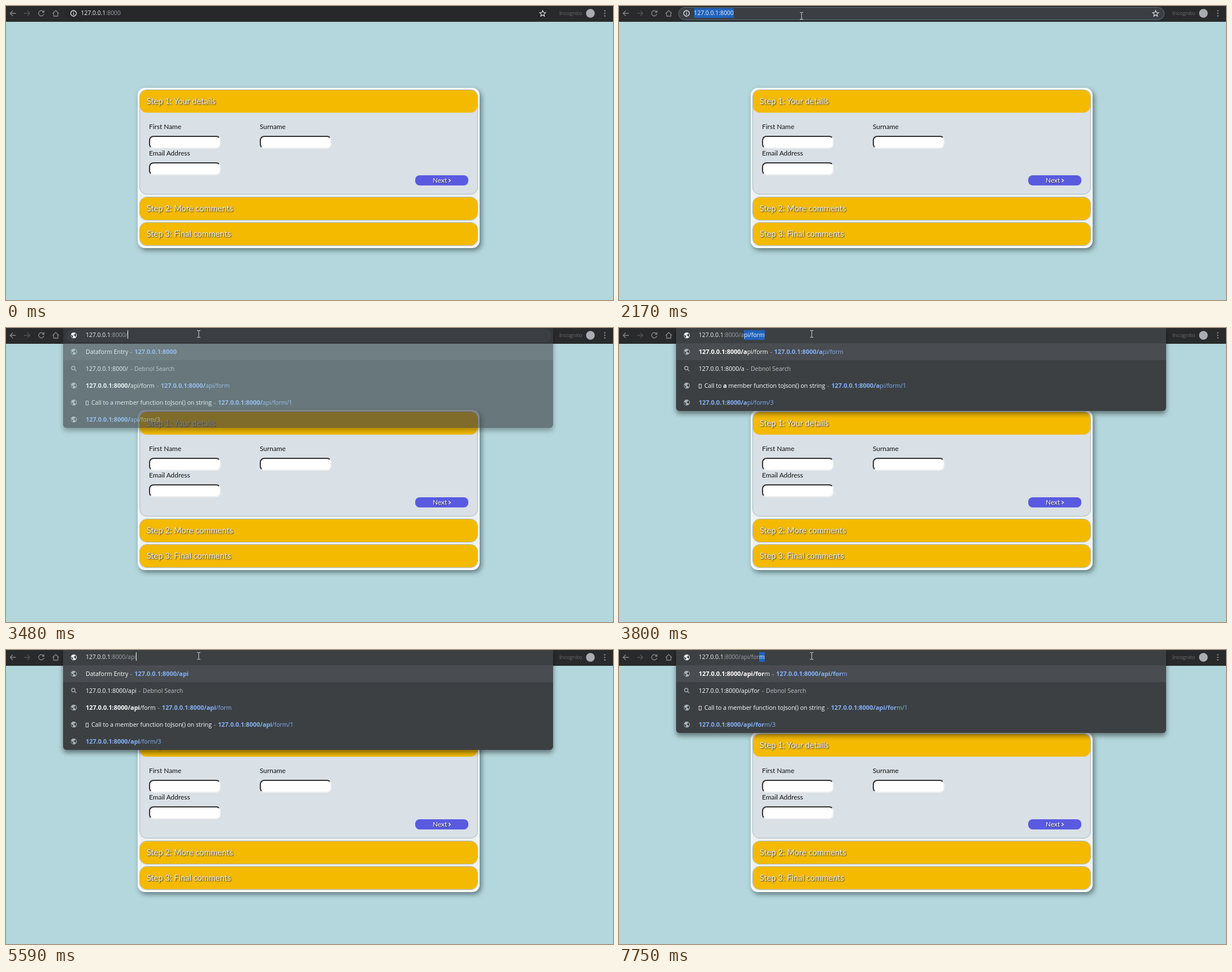
Recreate the animation shown at these times as an HTML page. Size 1074 px wide and 521 px high, loop 7990 ms.

```html
<!DOCTYPE html>
<html lang="en">
<head>
<meta charset="utf-8">
<title>Form</title>
<style>
html, body { margin: 0; width: 100%; height: 100%; overflow: hidden; }
body { position: relative; background: #b3d7dc; font: 11.9px Lato, sans-serif; color: #111; }
div, .abs { position: absolute; box-sizing: border-box; white-space: pre; }
svg { position: absolute; left: 0; top: 0; overflow: visible; }

.card { left: 233px; top: 145px; width: 605px; height: 284px; border: 3px solid #fafbfb; border-radius: 13px;
  background: #eef0f1; box-shadow: 3px 4px 9px rgba(40, 60, 65, .6); }
.panel { left: 236px; width: 599px; border: 1px solid #a5bac2; border-radius: 13px; background: #d9e0e6; }
.head { left: 0; top: 0; width: 597px; height: 40px; border-radius: 12px; background: #f3ba00; color: #f0f0f0;
  font-size: 14.6px; line-height: 40px; padding-left: 12px; text-shadow: 1px 1px 2px #333; }
.label { line-height: 16px; }
.field { width: 127px; height: 23px; border: 2px inset #767676; border-color: #858585 #ededed #ededed #858585;
  border-radius: 8px; background: #fff; }
.next { left: 724px; top: 300px; width: 94px; height: 18px; border-radius: 8px; background: #5a5ae0; color: #fff;
  line-height: 17px; padding-left: 31px; text-shadow: 1px 1px 1px #333; }

.bar { left: 0; top: 0; width: 100%; height: 27.5px; background: #292a2c; }
.pill { left: 105px; top: 2px; width: 860px; height: 22.5px; border-radius: 12px; background: #27282a; border: 1.5px solid transparent;
  background-clip: border-box; }
.pill.hover { background: #35383b; border-color: #35383b; }
.pill.focus { background: #3b3f43; border-color: #62727e; }
.pill.open { background: #3b3f43; border-color: #3b3f43; }
.ui { font-family: "Open Sans", "Noto Sans", sans-serif; }
.pop { left: 101px; top: 0; width: 867px; border-radius: 0 0 6px 6px; background: #3c4043; overflow: visible;
  box-shadow: 0 5px 9px rgba(0, 0, 0, .45); color: #fff; font-size: 10.5px; }
.row { left: 0; width: 867px; height: 30px; line-height: 30px; padding-left: 40px; }
.row.on { background: #494c50; }
.row b { font-size: 10.9px; }
.row svg { left: 18.5px; top: 15px; }
.link { color: #84b1f6; }
.grey { color: #bdc1c6; }
.dash { margin: 0 3.8px; color: #bdc1c6; }
.tofu { display: inline-block; width: 5px; height: 8px; border: 1px solid #ddd; box-sizing: border-box; margin-right: 5px; vertical-align: -0.5px; }
.url { top: 4px; height: 17px; line-height: 17px; font-size: 10.4px; color: #f1f3f4; }
.url i { font-style: normal; color: #9aa0a6; }
.url .sel, .url .sel i { background: #2063be; color: #f1f3f4; display: inline-block; height: 17px; }
.caret { top: 4px; width: 1px; height: 15px; background: #f1f3f4; display: inline-block; position: absolute; }
</style>
</head>
<body>
<div class="card"></div>
<div class="panel" style="top:148px;height:186px"><div class="head">Step 1: Your details</div></div>
<div class="panel" style="top:338px;height:42px"><div class="head">Step 2: More comments</div></div>
<div class="panel" style="top:383px;height:42px"><div class="head">Step 3: Final comments</div></div>
<div class="label" style="left:253px;top:206px">First Name</div>
<div class="label" style="left:449px;top:206px">Surname</div>
<div class="label" style="left:253px;top:253px">Email Address</div>
<div class="field" style="left:253px;top:230px"></div>
<div class="field" style="left:449px;top:230px"></div>
<div class="field" style="left:253px;top:277px"></div>
<div class="next">Next<svg width="1" height="1"><path d="M59.5 6.5l2.8 2.7-2.8 2.7" fill="none" stroke="#fff" stroke-width="1.3"/></svg></div>

<div class="bar"></div>
<div class="pill" id="pill"></div>
<svg width="1074" height="28" fill="none" stroke-width="1.3">
  <defs>
    <g id="globe">
      <circle r="5.3" fill="currentColor" stroke="none"/>
      <path d="M-4.6 -1.6L-1.5 1.5V4.2Q-4.6 3 -4.6 -1.6ZM0 -4.4L2.4 -3.6Q2.4 -1 .2 -1L-1 .3 2 .6 2.6 2.6 3.8 2.2Q5 -1 3 -3.4" fill="#35393c" stroke="none"/>
    </g>
    <g id="lens" fill="none" stroke="currentColor" stroke-width="1.3">
      <circle cx="-1" cy="-1" r="3"/><path d="M1.3 1.3L4.4 4.4"/>
    </g>
  </defs>
  <path stroke="#85888b" d="M17.5 13H7.5M12 8.3L7.3 13l4.700 4.700"/>
  <path stroke="#515356" d="M32 13h10M37.500 8.300L42.200 13l-4.700 4.700"/>
  <path stroke="#85888b" d="M66.300 10.300A4.700 4.700 0 1 0 67 14M67.300 7.500V11h-3.500"/>
  <path stroke="#85888b" d="M82.500 13.300L88 8l5.500 5.300M84.300 12V18h7.400V12"/>
  <circle cx="1034" cy="13" r="7.700" fill="#a9adb1"/>
  <g fill="#8b8e92"><circle cx="1059.500" cy="8.500" r="1.200"/><circle cx="1059.500" cy="13" r="1.200"/><circle cx="1059.500" cy="17.500" r="1.200"/></g>
  <g id="pageIcons" stroke="#e8eaed">
    <circle cx="119.500" cy="13" r="5"/><path d="M119.500 12.300v3.400M119.500 10v1.300"/>
    <path stroke-width="1.100" d="M949.500 8l1.500 3.500 3.800.3-2.900 2.500.9 3.700-3.300-2-3.300 2 .9-3.700-2.900-2.500 3.800-.3z"/>
  </g>
</svg>
<div class="ui" style="left:979px;top:5px;line-height:16px;font-size:9.3px;color:#6a6d71">Incognito</div>

<div class="pop ui" id="pop"></div>
<svg id="urlGlobe" width="1" height="1" style="left:119.500px;top:13px;color:#eceff1"><use href="#globe"/></svg>
<div class="url ui" id="url"></div>

<svg id="arrow" width="1" height="1"><path d="M0 0V14L3.200 11.200 5.500 16.200 7.700 15.200 5.500 10.300H10Z" fill="#fff" stroke="#111" stroke-width=".9"/></svg>
<svg id="beam" width="1" height="1"><path d="M-3 -6H-.8L0 -5.300.8 -6H3M0 -5.300V5.300M-3 6H-.8L0 5.300.8 6H3" fill="none" stroke="#d5d7d9" stroke-width="1"/></svg>

<script>
const LOOP = 7990, HOST = '127.0.0.1:8000', FORM = '/api/form';
const $ = id => document.getElementById(id);

// Each step adds to the state before it.
const steps = [
  [0, { pill: '', path: '', all: false, caret: false, fade: 1 }],
  [1010, { pill: 'hover' }],
  [1080, { pill: 'focus' }],
  [1240, { all: true }],
  [2700, { all: false, caret: true }],
  [3170, { caret: false }],
  [3480, { pill: 'open', path: '/', caret: true, fade: .63 }],
  [3590, { fade: 1 }],
  [3800, { path: '/a' }],
  [5200, { path: '/ap' }],
  [5590, { path: '/api' }],
  [6040, { caret: false }],
  [6510, { caret: true }],
  [6590, { path: '/api/' }],
  [7390, { path: '/api/f' }],
  [7600, { path: '/api/fo' }],
  [7750, { path: '/api/for' }]
];

const beamStops = [
  [930, 323, 10], [1240, 325, 13], [2170, 323, 17], [2240, 327, 20],
  [2400, 331, 20], [2480, 337, 18], [2550, 344, 13], [2620, 343, 11], [2700, 341, 10]
];

const icon = name => `<svg width="1" height="1" style="color:#a9b4b7"><use href="#${name}"/></svg>`;
const dash = '<span class="dash">-</span>';
const link = html => `<span class="link">${html}</span>`;

function popup(path) {
  const typed = HOST + path;
  const match = end => `<b>${typed}</b>${(HOST + end).slice(typed.length)}`;
  const home = path === '/' || path === '/api';
  const word = path === '/a' ? '<b>a</b>' : 'a';
  const search = ['lens', typed + dash + '<span class="grey">Debnol Search</span>'];
  const form = ['globe', match(FORM) + dash + link(match(FORM))];
  const rows = home
    ? [['globe', 'Dataform Entry' + dash + link(`<b>${typed.replace(/\/$/, '')}</b>`)], search, form]
    : [form, search];
  rows.push(
    ['globe', `<span class="tofu"></span>Call to ${word} member function toJson() on string` + dash + link(match(FORM + '/1'))],
    ['globe', link(match(FORM + '/3'))]
  );
  $('pop').style.height = 27 + rows.length * 30 + 'px';
  $('pop').innerHTML = rows.map(([kind, html], i) =>
    `<div class="row${i ? '' : ' on'}" style="top:${27 + i * 30}px">${icon(kind)}${html}</div>`).join('');
  return home ? '' : FORM.slice(path.length);
}

function show(s) {
  const open = s.path !== '';
  $('pill').className = 'pill ' + s.pill;
  $('pop').style.display = $('urlGlobe').style.display = open ? '' : 'none';
  $('pop').style.opacity = s.fade;
  $('pageIcons').style.display = open ? 'none' : '';
  const rest = open ? popup(s.path) : '';
  const text = `127.0.0.1<i>:8000${s.path}</i>`;
  $('url').style.left = open ? '141px' : '132.500px';
  $('url').innerHTML = (s.all ? `<span class="sel">${text}</span>` : text) +
    (rest ? `<span class="sel">${rest}</span>` : s.caret ? '<span class="caret" style="top:0"></span>' : '');
}

function place(el, on, x, y) {
  el.style.display = on ? '' : 'none';
  el.style.transform = `translate(${x}px, ${y}px)`;
}

function movePointer(t) {
  const k = Math.min(1, Math.max(0, Math.floor((t - 150) / 76.6) / 9));
  const left = (1 - k) ** 2 * (1 + 2 * k);
  place($('arrow'), t >= 150 && t < 930, 321.500 + 648 * left, 22.500 + 454 * left);
  const stop = beamStops.filter(p => p[0] <= t).pop();
  place($('beam'), !!stop, stop ? stop[1] : 0, stop ? stop[2] + .5 : 0);
}

let last = -1;
function draw(now) {
  const t = now % LOOP;
  const n = steps.filter(s => s[0] <= t).length;
  if (n !== last) {
    last = n;
    show(Object.assign({}, ...steps.slice(0, n).map(s => s[1])));
  }
  movePointer(t);
}

const start = performance.now();
function tick() {
  draw(performance.now() - start);
  requestAnimationFrame(tick);
}
tick();
</script>
</body>
</html>
```
